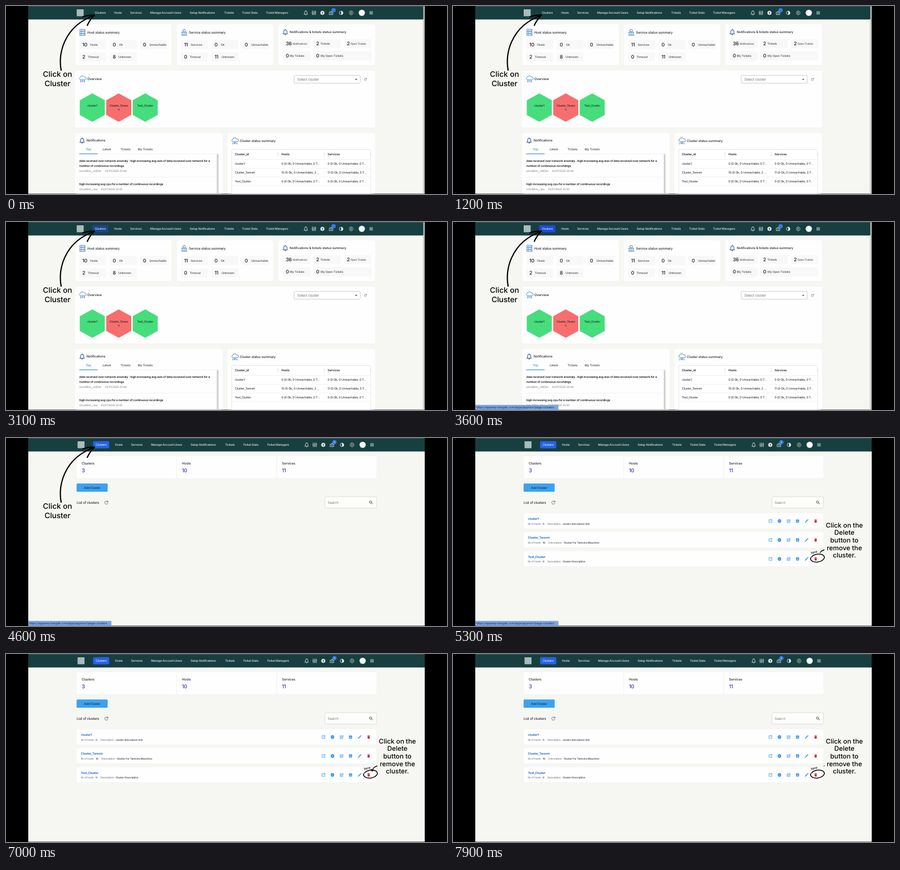
Animation of 792 by 340 pixels, one loop 8000 ms. Source, as an HTML page:

```html
<!DOCTYPE html>
<html lang="en">
<head>
<meta charset="utf-8">
<title>Removing a cluster</title>
<style>
html, body { margin: 0; width: 100%; height: 100%; overflow: hidden; background: #000; }
svg { display: block; width: 792px; height: 340px; }
text { font-family: Inter, Roboto, sans-serif; letter-spacing: -.03em; text-rendering: geometricPrecision; white-space: pre; }
.hint text { letter-spacing: 0; }
</style>
</head>
<body>
<svg id="stage" viewBox="0 0 792 340" xmlns="http://www.w3.org/2000/svg"></svg>
<script>
const LOOP = 8000, STEP = 100;
const INK = '#2a2c31', BLUE = '#2d8ae8', NAVY = '#20468f', PAGE = '#f6f6f2', TEAL = '#173f40';

// cy is the vertical middle of the line
const text = (x, cy, str, size = 5.3, fill = INK, weight = 500, extra = '') =>
  `<text x="${x}" y="${cy + size * .36}" font-size="${size}" fill="${fill}" font-weight="${weight}" ${extra}>${str}</text>`;
const middle = 'text-anchor="middle"';
const rect = (x, y, w, h, fill, r = 0, extra = '') =>
  `<rect x="${x}" y="${y}" width="${w}" height="${h}" rx="${r}" fill="${fill}" ${extra}/>`;
const circle = (x, y, r, fill) => `<circle cx="${x}" cy="${y}" r="${r}" fill="${fill}"/>`;
const line = (d, color, width = .9, extra = '') =>
  `<path d="${d}" fill="none" stroke="${color}" stroke-width="${width}" stroke-linecap="round" stroke-linejoin="round" ${extra}/>`;
const at = (x, y, body, scale = 1) => `<g transform="translate(${x} ${y}) scale(${scale})">${body}</g>`;
const group = (id, body, extra = '') => `<g id="${id}" ${extra}>${body}</g>`;
const card = (x, y, w, h) => rect(x, y, w, h, '#eeeeea', 3) + rect(x, y, w, h - .6, '#fefefe', 3);
const page = rect(40, .5, 712, 339, PAGE);

const bell = color => line('M-4 3H4L2.8 1V-1.4A2.8 2.8 0 0 0-2.8-1.4V1ZM-1 4.5H1M0-4.2V-5', color, 1);
const refresh = (x, y, r) => at(x, y, line('M2.5-1.4A2.9 2.9 0 1 0 2.8 1M2.8-3V-1H.8', '#555', .8), r / 3);

function header(active, dot) {
  const items = [[159.5, 'Clusters'], [194.3, 'Hosts'], [223, 'Services'], [259, 'Manage Account Users'],
    [330, 'Setup Notifications'], [392, 'Tickets'], [424, 'Ticket Stats'], [467, 'Ticket Managers']];
  const white = '#e4eceb';
  return rect(127, 6, 12.5, 12.5, '#a9bcba')
    + active
    + items.map(([x, label]) => text(x, 12.2, label, 5.28, white)).join('')
    + at(538.5, 12.4, bell(white), .8)
    + at(553, 12.4, line('M-2.7-3.5V-1M-2.7 1V3.5M0-3.5V1M0 3V3.5M2.7-3.5V-2M2.7 0V3.5M-3.6 0H-1.8M-.9 1.8H.9M1.8-1H3.6', white))
    + circle(568.3, 12.4, 3.6, white) + text(568.3, 12.5, '?', 5.6, TEAL, 800, middle)
    + at(584, 12.8, line('M-3-1.5H3V2.8H-3ZM-1.3-3H1.3M-1 .7H1', white, .8))
    + circle(588.3, 7.6, 3.8, '#2f7cf0') + text(588.3, 7.7, dot, 4.3, '#d5e5ff', 500, middle)
    + at(602, 12.4, line('M0-3.2A3.2 3.2 0 0 0 0 3.2A3.2 3.2 0 0 0 0-3.2', white) + `<path d="M0-3.2A3.2 3.2 0 0 1 0 3.2Z" fill="${white}"/>`)
    + at(620, 12.4, line('M-1-3.4H1L1.4-2.4 2.6-2.2 3.4-.6 2.8 0 3.4.9 2.6 2.3 1.4 2.4 1 3.4H-1L-1.4 2.4-2.6 2.3-3.4.9-2.8 0-3.4-.6-2.6-2.2-1.4-2.4ZM-1 0A1 1 0 0 0 1 0A1 1 0 0 0-1 0', white, .7))
    + circle(639, 12.3, 5.6, '#f6f7f7')
    + [-1.6, 1.6].map(dx => [-1.5, 1.5].map(dy =>
      rect(655.8 + dx - 1, 12.4 + dy - 1, 2, 2, 'none', .4, `stroke="${white}" stroke-width=".7"`)).join('')).join('');
}

const chip = (x, cy, w, count, label, labelX, size = 5.3) =>
  rect(x, cy - 8.3, w, 16.6, '#f8f8f8', 2)
  + text(x + 5, cy, count, 8.8, '#17181c') + text(labelX, cy + .3, label, size, '#4c4f56');

function summary(x, title, first, chipX, down) {
  const [count, name] = first;
  return card(x, 33, 173, 74.5) + text(x + 21.5, 47.8, title, 6.05)
    + chip(chipX, 69.7, 48, count, name, chipX + (name === 'Hosts' ? 19 : 17))
    + chip(chipX + 54.7, 69.7, 48, 0, 'Ok', chipX + 71)
    + chip(chipX + 109, 69.7, 48, 0, 'Unreachable', chipX + 125.5)
    + chip(chipX, 92, 48, down[0], 'Timeout', chipX + 15)
    + chip(chipX + 54.7, 92, 48, down[1], 'Unknown', chipX + (down[1] > 9 ? 72.5 : 70));
}

function hexagon(x, fill, lines) {
  return `<path d="M${x} 158l22.5 12.6v26.4L${x} 209.6l-22.5-12.6v-26.4Z" fill="${fill}"/>`
    + lines.map((s, i) => text(x, 180 + 7.6 * i, s, 5.2, '#1d2b22', 500, middle)).join('');
}

function notice(y, lines, source) {
  const last = y + 9 * (lines.length - 1);
  return lines.map((s, i) => text(131.5, y + 9 * i, s, 5.3, '#1c1d20', 600)).join('')
    + text(131.5, last + 9.2, source, 4.75, '#777', 400);
}

function dashboard() {
  const cloud = 'M-4 2.5A2.5 2.5 0 0 1-4-2A4 4 0 0 1 3.4-2.6A2.6 2.6 0 0 1 4.5 2.5Z';
  const icons =
    at(137.5, 47.7, [-4, 0, 4].map(y => line(`M-4.5 ${y - 1.7}H4.5V${y + 1.7}H-4.5ZM-2.8 ${y}H-1M2 ${y}H3`, y ? '#4b6f9f' : BLUE, .8)).join(''))
    + at(320, 47.7, line('M-4-1V5H4V-1M-4 5H5', BLUE, .9) + line('M-2.4-3A2.4 2.4 0 0 0 2.4-3A2.4 2.4 0 0 0-2.4-3M-4 0H4M-2 2.5H2', '#4b6f9f', .9))
    + at(501.7, 47.3, bell(NAVY)) + at(136.8, 243.4, bell(NAVY))
    + at(137.5, 131, line(cloud, BLUE, .9) + line('M-3 2.5V6M0 2.5V6.5M3 2.5V6M-4 6H-2M2 6H4', '#4b6f9f', .8))
    + at(411, 243, line(cloud, '#4b6f9f', .9) + line('M0 2.5V5M-4 7V5H4V7M0 5V7', BLUE, .9));
  const cell = (a, b) => `${a} (0 Ok, 0 Unreachable, ${b}...`;
  const rows = [['cluster1', cell(0, '0 T'), cell(0, '0 T')],
    ['Cluster_Tarevin', cell(10, '2 '), cell(11, '0 T')],
    ['Test_Cluster', cell(0, '0 T'), cell(0, '0 T')]];
  const columns = [411, 494.5, 577.5];
  return page + rect(40, .5, 710, 23.9, TEAL)
    + rect(747.5, 24.4, 2.5, 315, '#ebebe8') + rect(749.5, .5, 2.5, 339, '#bcbfbd')
    + header(group('hover', rect(154.6, 5.8, 29.2, 13, '#1f4bd8', 2)), '')
    + summary(124.5, 'Host status summary', [10, 'Hosts'], 132, [2, 8])
    + summary(307, 'Service status summary', [11, 'Services'], 314.7, [0, 11])
    + card(489, 33, 174, 74.5) + text(509.5, 47.3, 'Notifications &amp; tickets status summary', 5.9)
    + chip(497.5, 68, 49, 36, 'Notifications', 514.5, 4.6) + chip(552, 68, 49, 2, 'Tickets', 564.5)
    + chip(607, 68, 49, 2, 'Open Tickets', 618.7, 4.7) + chip(497.5, 90.2, 49, 0, 'My Tickets', 509.5)
    + chip(552, 90.2, 104, 0, 'My Open Tickets', 565)
    + card(124, 116.5, 539, 104) + text(146, 132.3, 'Overview', 6.1)
    + rect(517.5, 125.6, 118.7, 14, '#fff', 1.5, 'stroke="#bbb" stroke-width=".7"')
    + text(523, 132.8, 'Select cluster', 6.5, '#70757c', 400)
    + '<path d="M626.7 131.8h4.4l-2.2 2.4Z" fill="#555"/>' + refresh(645.5, 132.7, 2.1)
    + hexagon(155, '#46dd7c', ['cluster1']) + hexagon(202.5, '#f76e6e', ['Cluster_Tarevi', 'n'])
    + hexagon(250, '#46dd7c', ['Test_Cluster'])
    + card(124, 230, 265, 109.5) + text(144.5, 243.3, 'Notifications', 6)
    + [[148, 'Top'], [181, 'Latest'], [214.5, 'Tickets'], [250, 'My Tickets']].map(([x, s], i) =>
      text(x, 258.7, s, 5.5, i ? '#4a4d52' : BLUE, 500, middle)).join('')
    + rect(131.5, 267.3, 250, .5, '#e4e4e4') + rect(131.5, 266.8, 33, 1.1, BLUE)
    + notice(280.3, ['data received over network anomaly : high increasing avg size of data received over network for a',
      'number of continuous recordings'], 'LinuxMon__netDev  ·  02/07/2025 20:44')
    + rect(131.5, 309, 246, .5, '#e6e6e6')
    + notice(322.3, ['high increasing avg cpu for a number of continuous recordings'], 'LinuxMon__cpu  ·  02/07/2025 20:45')
    + rect(378.6, 268, 3, 71.5, '#cdcdcd')
    + card(397.5, 230, 265.5, 109.5) + text(420, 244, 'Cluster status summary', 6)
    + rect(405.3, 259.5, 249.5, 80, '#fff', 2, 'stroke="#dedede" stroke-width=".7"')
    + ['Cluster_id', 'Hosts', 'Services'].map((s, i) =>
      text(columns[i], 268.4, s, 5.5, INK, 600) + rect([488, 571, 654][i], 264.5, .7, 7.5, '#d2d2d2')).join('')
    + rows.map((row, r) => rect(405.5, 277.3 + 15.7 * r, 249, .5, '#e2e2e2')
      + row.map((s, i) => text(columns[i], 285.6 + 15.6 * r, s, 5.25, '#35373c')).join('')).join('')
    + rect(405.5, 324.4, 249, .5, '#e2e2e2') + icons;
}

function clusterRow(y, name, hosts, about) {
  const cy = y + 14.2, hole = '#fff', red = '#cc2231';
  const bold = s => `<tspan font-weight="600" fill="#4a4d52">${s}</tspan>`;
  return card(127, y, 538, 28.6) + text(134.5, y + 10, name, 5.6, '#1c66cb', 600)
    + text(134.5, y + 19.2, `Nr of hosts : ${bold(hosts)}  ·  Description : ${bold(about)}`, 4.65, '#777b81', 500)
    + at(570, cy, line('M0-2.5H-2.6V2.6H2.6V0M.8-2.7H2.7V-.8M2.5-2.5L-.5.5', BLUE, .7))
    + at(586.3, cy, circle(0, 0, 3.1, BLUE) + line('M-1.4 0H1.4', hole, .8))
    + at(602.5, cy, line('M.5-2.3H-2.5V2.7H2.4V0M-1 1.2V0M.5 1.2V-1M1.3-1.7H3.2M2.2-2.7V-.8', BLUE, .7))
    + at(618.7, cy, rect(-2.8, -2.8, 5.6, 5.6, BLUE, .8) + line('M-1.4 1.4V-.2M0 1.4V-1.5M1.4 1.4V.5', hole, .7))
    + at(635, cy, line('M-2.3 2.3L1.5-1.5M2-2L2.5-2.5', BLUE, 1.4))
    + at(651.3, cy, rect(-1.9, -1.5, 3.8, 4.3, red, .5) + line('M-2.1-2.4H2.1M-.7-2.9H.7', red, .7));
}

function clusters() {
  const stats = [[136, 'Clusters', 3], [316, 'Hosts', 10], [495.5, 'Services', 11]];
  return page + rect(40, .5, 712, 23.9, TEAL)
    + at(1.5, 0, header(rect(154.9, 5.8, 29, 13, '#2862e6', 2), '0'))
    + card(127, 33, 538.5, 40.5) + rect(306, 33, .7, 40, '#ececea') + rect(485.7, 33, .7, 40, '#ececea')
    + stats.map(([x, label, n]) => text(x, 46.2, label, 6.1) + text(x, 58.4, n, 9.4, '#3a3abc')).join('')
    + rect(126.8, 82.3, 55.8, 14.9, '#3da1f2', 1.5)
    + text(154.7, 89.6, 'Add Cluster', 5.5, '#12304d', 500, middle)
    + text(127, 116.7, 'List of clusters', 6.15) + refresh(180.3, 116.7, 3)
    + rect(572.8, 106.3, 92.4, 20.4, '#fdfdfb', 1.5, 'stroke="#d2d2cf" stroke-width=".7"')
    + text(577.7, 116.7, 'Search', 6.1, '#777', 400)
    + at(655.3, 116.3, line('M-2.6-.5A2.1 2.1 0 0 0 1.6-.5A2.1 2.1 0 0 0-2.6-.5M1.1 1.1L3.1 3.1', '#444', .9))
    + group('list', clusterRow(136, 'cluster1', 0, 'cluster description test')
      + clusterRow(170.2, 'Cluster_Tarevin', 10, 'Cluster For Tarevins Maschine')
      + clusterRow(204.5, 'Test_Cluster', 0, 'Cluster Description'));
}

const caption = (x, y, gap, size, lines) =>
  lines.map((s, i) => text(x, y + gap * i, s, size, '#000', 500, middle)).join('');

const stage = document.getElementById('stage');
stage.innerHTML = rect(0, 0, 792, 340, '#000')
  + group('dashboard', dashboard()) + group('clusters', clusters())
  + group('status', rect(40, 330.8, 149.3, 8.7, '#7da5df', 1)
    + text(42, 335.3, 'https://appamp.bangdb.com/apps/appmon?page=clusters', 5.35, '#1b3768', 400))
  + group('openHint', caption(92.5, 123.6, 16.2, 13.6, ['Click on', 'Cluster'])
    + line('M99 116C94 88 102 38 158 17', '#000', 2.2) + line('M138 19.5Q149 16 159 16.5Q151 24 146 35', '#000', 2.2), 'class="hint"')
  + group('deleteHint', caption(702.9, 157.7, 13.55, 11.8, ['Click on the', 'Delete', 'button to', 'remove the', 'cluster.']), 'class="hint"')
  + group('mark', at(654.8, 217.3, line('M-11.5-3.2A12.4 7.1 0 1 0 11.5-2.6A12.4 7.1 0 0 0-10-4.2', '#000', 1.5, 'id="ring" pathLength="100" transform="rotate(-9)"'))
    + group('here', text(643.3, 208, 'here', 5.9, '#000', 500, 'font-style="italic" transform="rotate(-14 643 210)"'))
    + line('M666.5 202.5C661 204 658.5 207 657.5 211.5', '#000', 1.3, 'id="tail" pathLength="100"')
    + line('M655.8 208.3L657.3 212L661 210', '#000', 1.2, 'id="tip"'));

const part = {};
stage.querySelectorAll('[id]').forEach(el => part[el.id] = el);

const ramp = (t, from, to) => Math.min(1, Math.max(0, (t - from) / (to - from)));
const fade = (el, amount) => {
  el.style.opacity = amount;
  el.style.display = amount > 0 ? '' : 'none';
};
const trace = (el, amount) => {
  fade(el, amount > 0 ? 1 : 0);
  el.setAttribute('stroke-dasharray', `${100 * amount} 200`);
};

function render(t) {
  const opened = t >= 4600;
  fade(part.dashboard, opened ? 0 : 1);
  fade(part.clusters, opened ? 1 : 0);
  fade(part.hover, ramp(t, 2900, 3300));
  fade(part.status, ramp(t, 3400, 3600) * (1 - ramp(t, 5700, 6400)));
  fade(part.list, ramp(t, 4600, 4800));
  fade(part.openHint, 1 - ramp(t, 4600, 4900));
  fade(part.deleteHint, ramp(t, 4800, 5200));
  trace(part.ring, ramp(t, 4800, 5200));
  fade(part.here, t >= 5200 ? 1 : 0);
  const tail = ramp(t, 5100, 5400) * (1 - .99 * ramp(t, 7200, 7900));
  trace(part.tail, tail);
  fade(part.tip, tail > .9 ? 1 : 0);
}

const start = performance.now();
function tick(now) {
  const t = Math.max(0, now - start) % LOOP;
  render(Math.floor(t / STEP) * STEP);
  requestAnimationFrame(tick);
}
render(0);
requestAnimationFrame(tick);
</script>
</body>
</html>
```
